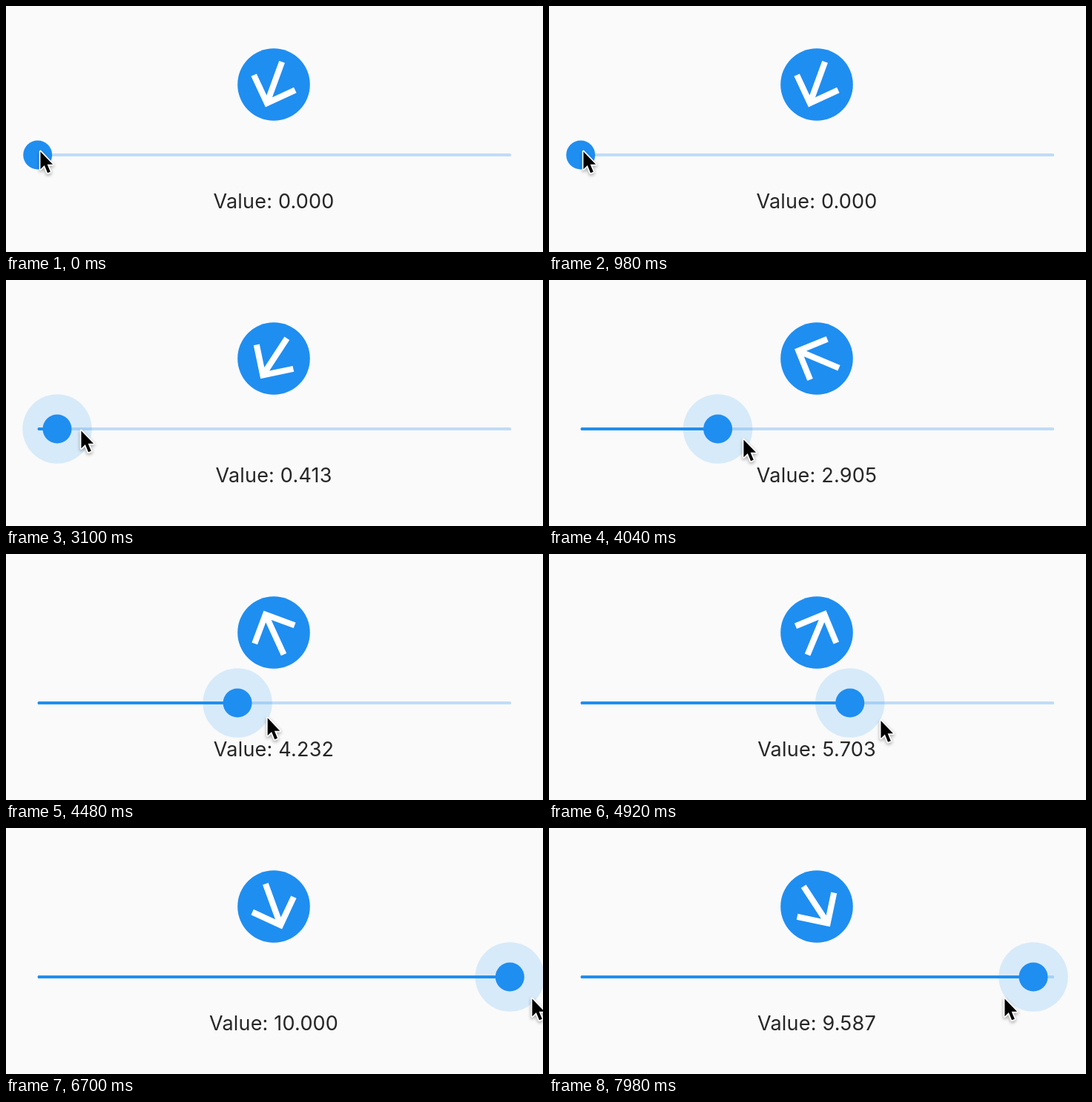
Animation, 724 px wide and 332 px high, one loop 8000 ms. Source, as an HTML page with a canvas:

```html
<!DOCTYPE html>
<html lang="en">
<head>
<meta charset="utf-8">
<title>Rotary slider</title>
<style>
  html, body { margin: 0; width: 100%; height: 100%; overflow: hidden; background: #fafafa; }
  canvas { display: block; width: 724px; height: 332px; }
</style>
</head>
<body>
<canvas id="stage"></canvas>
<script>
const W = 724, H = 332, LOOP = 8000;
const BLUE = '#1f8ef1', PAPER = '#fafafa', INK = '#262626';
const TRACK = { x: 42.7, y: 201, perUnit: 63.66 };
const DIAL = { x: 361, y: 106, r: 48.8 };

// Motion runs in even steps; the thumb trails the pointer by LAG steps
const LAG = 4, PRESS = 51.1, PRESS_STEPS = 2.15;

// Pointer path: step, x, y
const PATH = [
  [0, 45, 194], [58, 45, 194], [63, 70.99, 198], [67, 100, 201],
  [82, 229.63, 210.5], [86, 261, 213], [102, 407.75, 221.5], [106, 446, 222.5],
  [120, 576.2, 226], [124, 613, 226.5], [132, 684, 228], [139, 708, 228],
  [155, 708, 228], [164, 684, 228], [167, 655.01, 228], [171, 613, 228]
];
const ARROW = new Path2D('M4 12l1.41 1.41L11 7.83V20h2V7.83l5.58 5.59L20 12l-8-8-8 8z');
const POINTER = new Path2D('M1.5 2.5V27.5L7.2 22.2L11.6 33L15.6 31.3L11.2 20.9H19Z');

const canvas = document.getElementById('stage');
const ctx = canvas.getContext('2d');
const ratio = window.devicePixelRatio || 1;
canvas.width = W * ratio;
canvas.height = H * ratio;

const clamp = (v, lo, hi) => Math.min(hi, Math.max(lo, v));

// Three steps every 140 ms, held for 100, 20 and 20 ms
function stepAt(t) {
  const group = Math.floor((t - 20) / 140);
  const phase = t - 20 - group * 140;
  return 3 * group + 1 + (phase >= 100) + (phase >= 120);
}

const slope = (i, k) => (PATH[i + 1][k] - PATH[i][k]) / (PATH[i + 1][0] - PATH[i][0]);

// Tangent that never overshoots its neighbours
function tangent(i, k) {
  if (i === 0) return slope(0, k);
  if (i === PATH.length - 1) return slope(i - 1, k);
  const a = slope(i - 1, k), b = slope(i, k);
  return a * b <= 0 ? 0 : 2 * a * b / (a + b);
}

function along(n, k) {
  n = clamp(n, 0, PATH[PATH.length - 1][0]);
  let i = 0;
  while (i < PATH.length - 2 && n > PATH[i + 1][0]) i++;
  const p = PATH[i], q = PATH[i + 1], d = q[0] - p[0], u = (n - p[0]) / d;
  const s = u * u * (3 - 2 * u);
  return p[k] * (1 - s) + q[k] * s
    + d * u * (1 - u) * ((1 - u) * tangent(i, k) - u * tangent(i + 1, k));
}

function disc(x, y, r, fill) {
  ctx.fillStyle = fill;
  ctx.beginPath();
  ctx.arc(x, y, r, 0, Math.PI * 2);
  ctx.fill();
}

function bar(x0, x1, fill) {
  ctx.fillStyle = fill;
  ctx.beginPath();
  ctx.roundRect(x0, TRACK.y - 2, Math.max(0, x1 - x0), 4, 1.5);
  ctx.fill();
}

function drawDial(value) {
  disc(DIAL.x, DIAL.y, DIAL.r, BLUE);
  ctx.save();
  ctx.translate(DIAL.x, DIAL.y);
  ctx.rotate((value * 32 - 160) * Math.PI / 180);
  ctx.scale(DIAL.r / 12, DIAL.r / 12);
  ctx.translate(-12, -12);
  ctx.fillStyle = '#fff';
  ctx.fill(ARROW);
  ctx.restore();
}

function drawSlider(value, n) {
  const x = TRACK.x + value * TRACK.perUnit;
  bar(TRACK.x, 681, '#c0dcf8');
  if (value > 0) bar(TRACK.x, x, BLUE);
  const u = clamp((n - PRESS) / PRESS_STEPS, 0, 1);
  if (u > 0) disc(x, TRACK.y, 46.7 * u * u * (3 - 2 * u), 'rgba(33,150,243,.16)');
  disc(x, TRACK.y, 19.5, BLUE);
}

function drawLabel(value) {
  ctx.fillStyle = INK;
  ctx.font = '400 27px Inter, Roboto, sans-serif';
  ctx.letterSpacing = '0.2px';
  ctx.textAlign = 'center';
  ctx.textBaseline = 'alphabetic';
  ctx.fillText('Value: ' + value.toFixed(3), 361, 273.3);
}

function drawPointer(x, y) {
  ctx.save();
  ctx.translate(x, y);
  ctx.scale(0.95, 0.95);
  ctx.lineJoin = 'round';
  ctx.lineWidth = 3.6;
  ctx.strokeStyle = '#fff';
  ctx.shadowColor = 'rgba(0,0,0,.35)';
  ctx.shadowBlur = 4 * ratio;
  ctx.shadowOffsetY = 2 * ratio;
  ctx.stroke(POINTER);
  ctx.shadowColor = 'transparent';
  ctx.fillStyle = '#000';
  ctx.fill(POINTER);
  ctx.restore();
}

function draw(t) {
  const n = stepAt(t);
  const value = clamp((along(n - LAG, 1) - 2 - TRACK.x) / TRACK.perUnit, 0, 10);
  const shown = value < 0.006 ? 0 : value;
  ctx.setTransform(ratio, 0, 0, ratio, 0, 0);
  ctx.fillStyle = PAPER;
  ctx.fillRect(0, 0, W, H);
  drawDial(shown);
  drawSlider(shown, n);
  drawLabel(shown);
  drawPointer(along(n, 1), along(n, 2));
}

let start;
function tick(now) {
  if (start === undefined) start = now;
  draw((now - start) % LOOP);
  requestAnimationFrame(tick);
}
draw(0);
requestAnimationFrame(tick);
</script>
</body>
</html>
```
